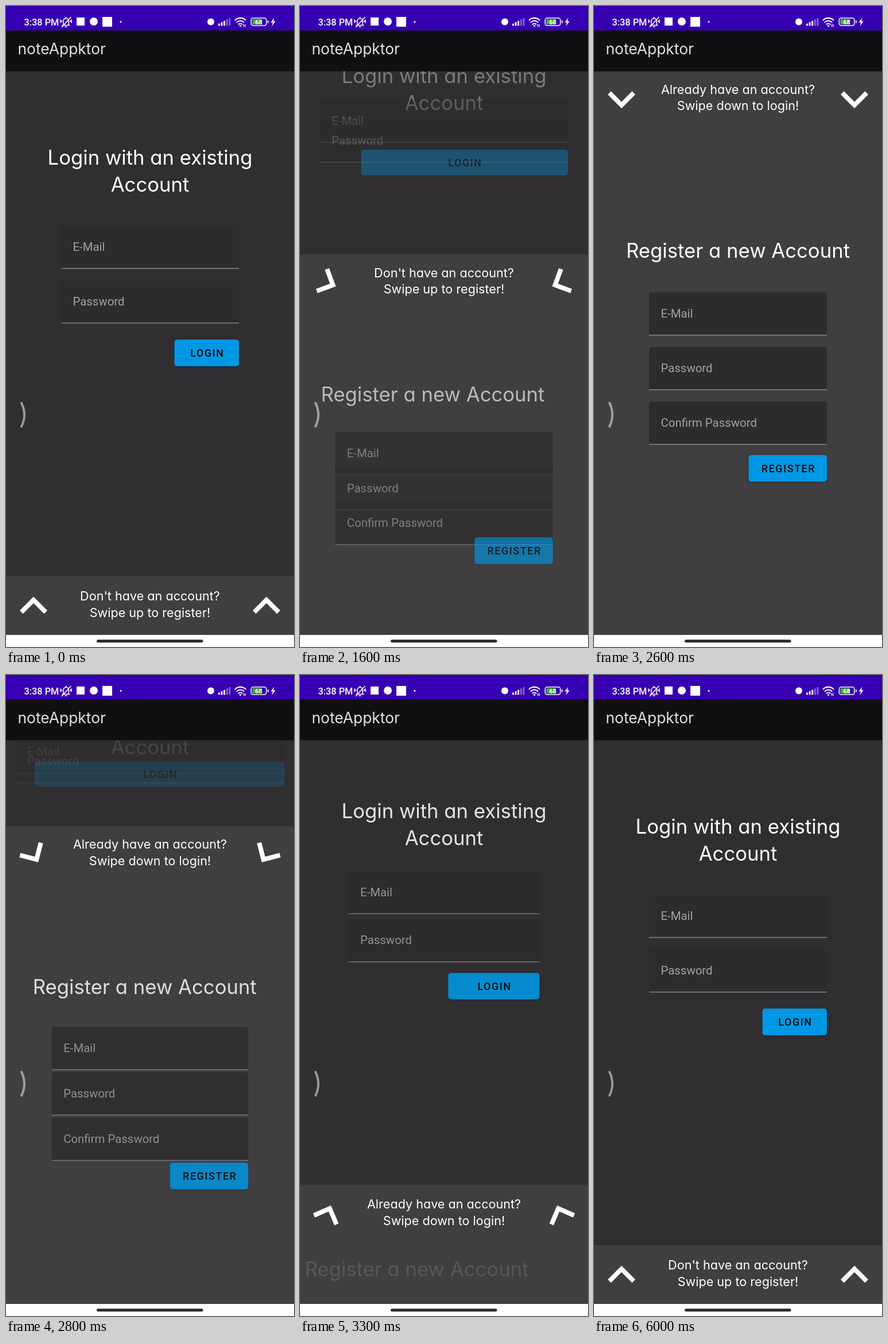
An HTML page for the animation above (6.1 s loop, 502 px wide and 1115 px high).

```html
<!DOCTYPE html>
<html lang="en">
<head>
<meta charset="utf-8">
<title>Swipe between login and register</title>
<style>
  html, body { margin: 0; width: 100%; height: 100%; overflow: hidden; background: #302e31; }
  svg { display: block; width: 100vw; height: 100vh; }
  .geo { font-family: Inter, "Open Sans", sans-serif; font-feature-settings: "cv11"; fill: #fff; }
  .head { font-size: 34.7px; }
  .hint { font-size: 21.6px; text-anchor: middle; }
  .label { font: 20.4px Roboto, sans-serif; fill: #a2a1a3; }
  .btn { font: 500 17.9px Roboto, sans-serif; letter-spacing: 1.6px; text-anchor: middle; fill: #05090c; }
  .status { font: 500 16.3px Roboto, sans-serif; fill: #fff; }
  .shade { filter: drop-shadow(0 1.5px 1.5px rgba(0, 0, 0, .3)); }
</style>
</head>
<body>
<svg id="stage" viewBox="0 0 502 1115">
  <rect width="502" height="1115" fill="#302e31"/>
  <g id="login"></g>
  <rect id="panel" width="502" fill="#403e41"/>
  <g id="register"></g>
  <g id="bar"></g>

  <rect y="42" width="502" height="71.5" fill="#110f12"/>
  <text class="geo" x="20.5" y="84" font-size="26.4" style="fill:#e3e2e3">noteAppktor</text>
  <rect width="502" height="42.5" fill="#3700b3"/>
  <g id="icons" fill="none" stroke="#fff" stroke-linecap="round">
    <text class="status" x="31.5" y="33.5" stroke="none">3:38 PM</text>
    <path stroke-width="1.6" d="M98 33.5H111M100 33V26a4.6 4.6 0 0 1 9.2 0V33M104.6 21V19.5M103 36h3M97.5 36.5L113 19.5M95 24v5M97 25.5v2M114 24v5M112 25.5v2"/>
    <g fill="#fff" stroke="none">
      <rect x="123" y="20" width="14" height="14"/>
      <circle cx="153" cy="27" r="7"/>
      <rect x="168" y="19" width="17" height="17"/>
      <circle cx="200" cy="27.5" r="1.5"/>
      <circle cx="357" cy="27.5" r="6"/>
    </g>
    <g id="signal"></g>
    <path stroke-width="2.1" d="M399.5 24.5a13 13 0 0 1 18 0M402.5 28.2a8.6 8.6 0 0 1 12 0M405.5 31.7a4.3 4.3 0 0 1 6 0"/>
    <circle cx="408.5" cy="34.5" r="1.6" fill="#fff" stroke="none"/>
    <path stroke-width="1.2" d="M414.5 32v4M417 32v4"/>
    <rect x="427.3" y="21" width="26.5" height="13" rx="3.5" stroke-width="1.5"/>
    <rect x="429.3" y="23" width="17" height="9" rx="1.5" fill="#43b02a" stroke="none"/>
    <path stroke-width="1.8" d="M456.8 26v3"/>
    <text x="440.5" y="31.5" stroke="none" fill="#fff" text-anchor="middle" font-family="Roboto, sans-serif" font-size="11" font-weight="700">68</text>
    <path fill="#fff" stroke="none" d="M467.5 20.5L461.5 28.5H465L463.5 35L469.7 26.5H466Z"/>
  </g>

  <rect y="1094" width="502" height="21" fill="#fdfdfd"/>
  <rect x="158" y="1102.3" width="185.5" height="5" rx="2.5" fill="#2b2a2c"/>
  <path d="M27 690.5Q37 711 27 731.5" fill="none" stroke="#fff" stroke-opacity=".5" stroke-width="4" stroke-linecap="round"/>
</svg>
<script>
const $ = id => document.getElementById(id);
const LOOP = 6100, STEP = 100;
// panel progress per step, from the start of each swipe
const UP = { start: 1300, path: [0, .2, .43, .638, .8, .91, .97, 1] };
const DOWN = { start: 2700, path: [1, .83, .71, .571, .41, .25, .12, .03, 0] };
const mix = (a, b, p) => a + (b - a) * p;

function set(node, attrs) {
  for (const k in attrs) node.setAttribute(k, attrs[k]);
  return node;
}
function add(parent, tag, attrs, text) {
  const node = set(document.createElementNS('http://www.w3.org/2000/svg', tag), attrs);
  if (text) node.textContent = text;
  return parent.appendChild(node);
}

function makeField(parent, label) {
  const g = add(parent, 'g', {});
  const box = add(g, 'path', { fill: '#2d2b2e' });
  const line = add(g, 'rect', { height: 1.4, fill: '#8d8c8e' });
  const text = add(g, 'text', { class: 'label' }, label);
  return (inset, base, alpha) => {
    const w = 502 - 2 * inset;
    set(g, { opacity: alpha });
    set(box, { d: `M${inset} ${base}v-69.5q0-5 5-5h${w - 10}q5 0 5 5v69.5z` });
    set(line, { x: inset, y: base - .7, width: w });
    set(text, { x: inset + 20.5, y: base - 30.5 });
  };
}

function makeButton(parent, label) {
  const g = add(parent, 'g', {});
  const box = add(g, 'rect', { rx: 5, fill: '#0098e4', class: 'shade' });
  const text = add(g, 'text', { class: 'btn' }, label);
  return (left, right, top, height, alpha) => {
    set(g, { opacity: alpha });
    set(box, { x: left, y: top, width: right - left, height });
    set(text, { x: (left + right) / 2 + 1.2, y: top + height / 2 + 6.6 });
  };
}

const loginHead = add($('login'), 'g', { class: 'geo head', 'text-anchor': 'middle' });
add(loginHead, 'text', { x: 251, y: 276 }, 'Login with an existing');
add(loginHead, 'text', { x: 251, y: 323 }, 'Account');
const loginFields = ['E-Mail', 'Password'].map(s => makeField($('login'), s));
const loginButton = makeButton($('login'), 'LOGIN');

const regHead = add($('register'), 'text', { class: 'geo head', 'text-anchor': 'middle' }, 'Register a new Account');
const regFields = ['E-Mail', 'Password', 'Confirm Password'].map(s => makeField($('register'), s));
const regButton = makeButton($('register'), 'REGISTER');

const hints = [
  ["Don't have an account?", 'Swipe up to register!'],
  ['Already have an account?', 'Swipe down to login!']
].map(lines => {
  const g = add($('bar'), 'g', { class: 'geo hint' });
  lines.forEach((s, i) => add(g, 'text', { x: 251, y: 1034 + 28.5 * i }, s));
  return g;
});
const arrows = [48, 454].map(() =>
  add($('bar'), 'path', { fill: '#fff', d: 'M0-16L-24 8l5.64 5.64L0-4.7 18.36 13.64 24 8z' }));

for (let i = 0; i < 5; i++) {
  const h = 4 + 2.4 * i;
  add($('signal'), 'rect', { x: 370 + 4.6 * i, y: 34.5 - h, width: 2.9, height: h, rx: 1,
    fill: '#fff', stroke: 'none', opacity: i < 3 ? 1 : .4 });
}

function progress(t) {
  const swipe = t < DOWN.start ? UP : DOWN;
  const i = Math.max(0, Math.floor((t - swipe.start) / STEP));
  return swipe.path[Math.min(i, swipe.path.length - 1)];
}

function draw(t) {
  const p = progress(t);
  const finish = s => s.start + (s.path.length - 1) * STEP;
  const registering = t >= finish(UP) && t < finish(DOWN);

  // login form slides up, widens and fades out
  const out = mix(96, 0, p);
  set(loginHead, { transform: `translate(0 ${-223 * p})`, opacity: 1 - p });
  loginFields[0](out, mix(456.5, 112.5, p), 1 - p);
  loginFields[1](out, mix(551.5, 113, p), 1 - p);
  loginButton(mix(293.5, 0, p), 502 - out, mix(580.3, 62.5, p), 46.5 - 3 * p, 1 - p);

  const top = mix(992, 114, p);
  set($('panel'), { y: top, height: 1094 - top });

  // register form rises, narrows and fades in
  const inset = mix(0, 96, p);
  set(regHead, { x: mix(197, 251, p), y: mix(1129, 438, p), opacity: p });
  regFields[0](inset, mix(1243, 572.5, p), p);
  regFields[1](inset, mix(1244, 667.5, p), p);
  regFields[2](inset, mix(1244, 762.5, p), p);
  regButton(502 - inset - 136.5, 502 - inset, mix(1176.5, 781, p), 46.5, p);

  const rise = -881.5 * p;
  hints.forEach((g, i) => set(g, {
    transform: `translate(0 ${rise})`,
    visibility: registering === (i === 1) ? 'visible' : 'hidden'
  }));
  arrows.forEach((a, i) => set(a, {
    transform: `translate(${i ? 454 : 48} ${1043.5 + rise}) rotate(${(i ? -180 : 180) * p})`
  }));
}

const begin = performance.now();
function tick() {
  draw((performance.now() - begin) % LOOP);
  requestAnimationFrame(tick);
}
draw(0);
requestAnimationFrame(tick);
</script>
</body>
</html>
```
